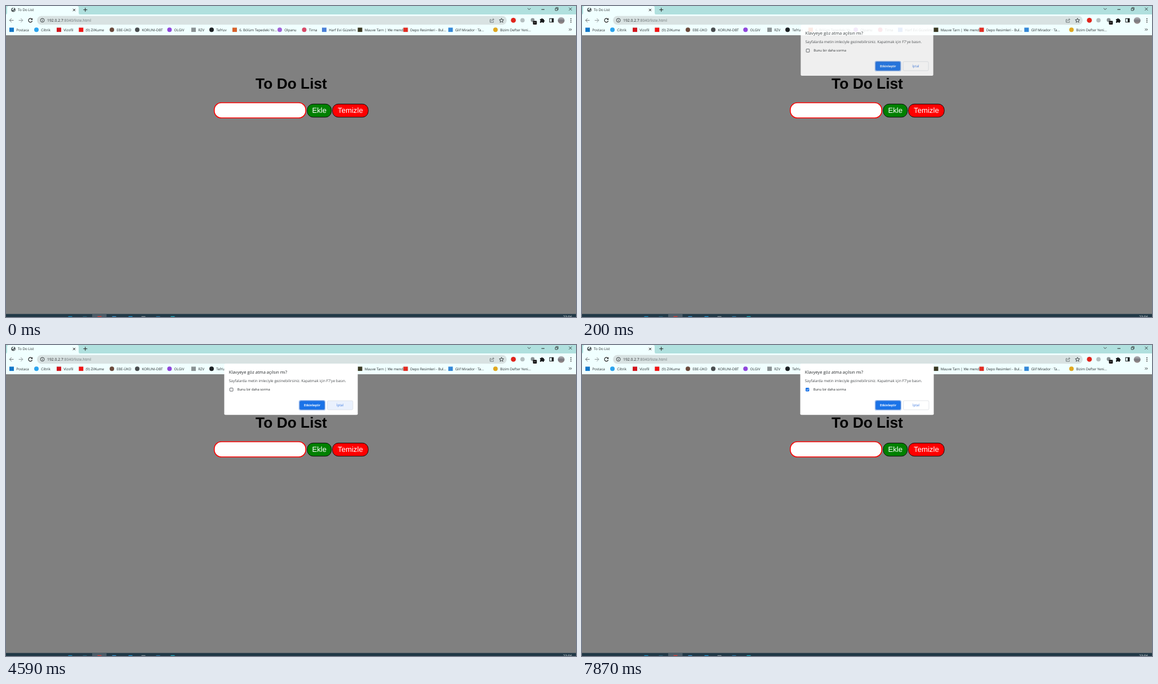
Write an HTML page that moves like this. It is 1012 px wide and 553 px high and loops after 8 s.

```html
<!DOCTYPE html>
<html lang="tr">
<head>
<meta charset="utf-8">
<title>To Do List</title>
<style>
  html, body { margin: 0; width: 100%; height: 100%; overflow: hidden; background: #808080; }
  svg { display: block; width: 100vw; height: 100vh; text-rendering: geometricPrecision; }
  .ui { font-family: "Open Sans", "Noto Sans", sans-serif; font-size: 6.25px; fill: #25292b; }
  .page { font-family: "Liberation Sans", Arial, sans-serif; font-size: 13.18px; }
  .line { fill: none; stroke: #3c4244; stroke-width: 1; }
  .mid { text-anchor: middle; }
</style>
</head>
<body>
<svg viewBox="0 0 1012 553" preserveAspectRatio="none">
  <rect width="1012" height="553" fill="#808080"/>

  <!-- tab strip -->
  <g class="ui">
    <rect width="1012" height="16" fill="#b0e0de"/>
    <rect y="15" width="1012" height="37" fill="#f0ffff"/>
    <path d="M0 15.5Q2 15 2 12V3Q2 0 5 0H126Q129 0 129 3V12Q129 15 132 15.5Z" fill="#f0ffff"/>
    <circle cx="13" cy="6.8" r="3.8" fill="#4d5457"/>
    <path d="M10.3 5.4Q12 6 12.3 4T14.5 4.2L13.6 6.2L11.6 7.6ZM13.2 8.2L15.6 7.2L14.6 9.4Z" fill="#f0ffff"/>
    <text x="21" y="9.2">To Do List</text>
    <g class="line">
      <path d="M118.8 5L123 9.2M123 5L118.8 9.2" stroke="#222"/>
      <path d="M137.3 6.7H144.3M140.8 3.2V10.2" stroke="#222"/>
      <path d="M926.2 4L928.8 6.6L931.4 4"/>
      <path d="M950.6 6.2H956" stroke="#222"/>
      <path d="M975.2 4.2H979V8H975.2ZM976.4 4V2.8H980.2V6.8H979.2" stroke="#222" stroke-width=".8"/>
      <path d="M999.4 2.8L1004.6 8M1004.6 2.8L999.4 8" stroke="#222" stroke-width=".8"/>
    </g>

    <!-- address row -->
    <g class="line">
      <path d="M13.5 25.5H6.4M9.8 22L6.3 25.5L9.8 29" stroke="#6c7476"/>
      <path d="M22.6 25.5H29.7M26.3 22L29.8 25.5L26.3 29" stroke="#8d9799"/>
      <path d="M46.2 23.6A3.4 3.4 0 1 0 46.6 26.5" stroke="#222" stroke-width="1.2"/>
      <path d="M47.2 21.5V24.8H43.9Z" fill="#222" stroke="none"/>
    </g>
    <rect x="55" y="17.8" width="834" height="15.4" rx="7.7" fill="#d8e2e2"/>
    <circle class="line" cx="64.6" cy="25.4" r="3.4" stroke-width=".8"/>
    <path class="line" d="M64.6 25V27.3M64.6 23.3V24.1"/>
    <text x="73" y="27.8" font-size="6.8">192.0.2.7<tspan fill="#6b7476">:8040/liste.html</tspan></text>
    <g class="line" stroke-width=".8">
      <path d="M861.5 24H859.5V29H865.5V27.3M861.5 27Q862 24 866 24M864.2 22L866.4 24L864.2 26" stroke="#6c7476"/>
      <path d="M879.7 21.8L880.8 24.4L883.6 24.6L881.5 26.4L882.2 29.1L879.7 27.6L877.2 29.1L877.9 26.4L875.8 24.6L878.6 24.4Z"/>
    </g>
    <circle cx="900.8" cy="25.4" r="4.4" fill="#e0241c"/>
    <circle cx="917" cy="25.4" r="3.8" fill="#b4bfc0"/>
    <circle cx="935" cy="25" r="3.4" fill="#8a9395"/>
    <rect x="935.6" y="26.6" width="6.8" height="6.4" rx="1" fill="#111"/>
    <path d="M937.5 29.8H940.5" stroke="#ddd" stroke-width=".7"/>
    <path d="M948 23.3H950.2A1.4 1.4 0 1 1 953 23.3H955V25.2A1.4 1.4 0 1 1 955 28V29.8H952.8A1.3 1.3 0 0 0 950.3 29.8H948V27.5A1.3 1.3 0 0 0 948 25Z" fill="#161a1b"/>
    <rect x="965.2" y="22.3" width="6.6" height="6.4" fill="none" stroke="#161a1b"/>
    <rect x="968.8" y="22" width="3.4" height="7" fill="#161a1b"/>
    <circle cx="985.7" cy="25.7" r="6" fill="url(#photo)"/>
    <g fill="#222"><circle cx="1003" cy="22.6" r=".9"/><circle cx="1003" cy="25.6" r=".9"/><circle cx="1003" cy="28.6" r=".9"/></g>
    <path class="line" d="M999.6 40L1001.4 41.9L999.6 43.8M1002.2 40L1004 41.9L1002.2 43.8" stroke="#222"/>
    <g id="marks"></g>
  </g>

  <!-- page -->
  <g class="page">
    <text class="mid" x="506.5" y="147.3" font-size="26.35" font-weight="700">To Do List</text>
    <rect x="369.8" y="172" width="162.4" height="27" rx="12.6" fill="#fff" stroke="red" stroke-width="1.6"/>
    <g stroke="#000" stroke-width=".9">
      <rect x="534.9" y="174.3" width="42.7" height="23.4" rx="10.4" fill="green"/>
      <rect x="579.7" y="174.3" width="63.4" height="23.4" rx="10.4" fill="red"/>
    </g>
    <g class="mid" fill="#fff">
      <text x="556.3" y="190.4">Ekle</text>
      <text x="611.4" y="190.4">Temizle</text>
    </g>
  </g>

  <!-- taskbar -->
  <rect y="547.6" width="1012" height="6" fill="#203846"/>
  <rect x="153" y="547.6" width="25.5" height="6" fill="#4c5c68"/>
  <g id="tasks"></g>
  <text class="ui" x="989" y="555" font-size="6" style="fill:#fff">23:06</text>

  <!-- dialog -->
  <g id="dialog" class="ui">
    <rect x="387.5" y="33.3" width="237" height="91" rx="2" fill="#fff"/>
    <text x="395.8" y="50.6" style="font-size:7.6px">Klavyeye göz atma açılsın mı?</text>
    <text x="395.8" y="65.5" style="font-size:6.5px;fill:#44484b">Sayfalarda metin imleciyle gezinebilirsiniz. Kapatmak için F7'ye basın.</text>
    <circle id="ripple" cx="400.2" cy="79.3" fill="#1a73e8"/>
    <rect id="box" x="397.4" y="76.5" width="5.6" height="5.6" rx=".6" stroke-width=".9"/>
    <path id="tick" d="M398.5 79.4L399.8 80.7L402.2 77.9" fill="none" stroke="#fff" stroke-width=".9"/>
    <text x="410.7" y="81.4" style="font-size:5.9px">Bunu bir daha sorma</text>
    <rect x="520.4" y="98.5" width="46" height="17.3" rx="2.4" fill="#fff" stroke="#86b1f0" stroke-width="1.1"/>
    <rect id="ok" x="521.7" y="99.7" width="43.6" height="14.9" rx="1.4" stroke="#1a62cc" stroke-width=".8"/>
    <text class="mid" x="543.5" y="109.2" style="font-size:5.6px;font-weight:700;fill:#fff">Etkinleştir</text>
    <rect id="cancel" x="570.5" y="99" width="45.4" height="16.2" rx="2" stroke="#dbdfe4" stroke-width=".8"/>
    <text class="mid" x="593" y="109.2" style="font-size:6.1px;fill:#3f7be0">İptal</text>
  </g>

  <defs>
    <linearGradient id="photo" x2="0" y2="1">
      <stop stop-color="#b9b9bd"/><stop offset=".55" stop-color="#77777d"/><stop offset="1" stop-color="#9c8f8c"/>
    </linearGradient>
  </defs>
</svg>
<script>
const LOOP = 8000;
const $ = id => document.getElementById(id);

function add(parent, tag, attrs, text) {
  const el = document.createElementNS("http://www.w3.org/2000/svg", tag);
  set(el, attrs);
  if (text) el.textContent = text;
  parent.appendChild(el);
}
function set(el, attrs) {
  for (const key in attrs) el.setAttribute(key, attrs[key]);
}

// icon centre, icon colour, round?, label
const marks = [
  [10, "#1277c8", 0, "Postaca"], [54, "#2aa4ee", 1, "Ciltrik"],
  [94, "#d2141c", 0, "Vizofil"], [133.3, "#f01414", 0, "(9) ZilKume"],
  [188, "#6b4a3c", 1, "EBE-ÜKO"], [233, "#4a4e50", 1, "KORUNI-DBT"],
  [290.3, "#9046dc", 1, "OLGIV"], [333, "#8b9294", 0, "RZV"],
  [365, "#1c2124", 1, "TelYuv"], [406, "#d8622c", 0, "6. Bölüm Tepedeki Yo..."],
  [486, "#a060d8", 1, "Olpanu"], [529.5, "#d84a68", 1, "Tirna"],
  [565, "#4a80d8", 0, "Harf Evi Güzelim"], [628.5, "#3a3822", 0, "Mauve Tarn | We mend..."],
  [709.5, "#e22c22", 0, "Depo Resimleri - Bul..."], [789.3, "#3488d8", 0, "Glif Mirador · Ta..."],
  [869, "#e0a820", 1, "Bizim Defter Yeni..."]
];
for (const [x, fill, round, label] of marks) {
  if (round) add($("marks"), "circle", { cx: x, cy: 42.3, r: 4, fill });
  else add($("marks"), "rect", { x: x - 4, y: 38.5, width: 8, height: 7.6, fill });
  add($("marks"), "text", { x: x + 8.2, y: 44.5 }, label);
}

const tasks = [[114, "#1d86b4"], [140, "#2a5a70"], [166, "#d83a34"], [192, "#3c8cc0"],
  [221, "#2590c8"], [244, "#7d8a92"], [270, "#2e6f96"], [296, "#20a4b4"]];
for (const [x, fill] of tasks)
  add($("tasks"), "rect", { x: x - 3.5, y: 551.6, width: 7, height: 2, fill });

// value held from the latest step reached
function held(t, start, steps) {
  let value = start;
  for (const [at, v] of steps) if (t >= at) value = v;
  return value;
}
function mix(a, b, k) {
  return "rgb(" + a.map((v, i) => Math.round(v + (b[i] - v) * k)) + ")";
}

function draw(t) {
  const alpha = held(t, 0, [[70, .22], [130, .57], [200, .88], [270, 1]]);
  const scale = held(t, .95, [[70, .962], [130, .979], [200, .993], [270, 1]]);
  set($("dialog"), {
    opacity: alpha,
    transform: `translate(506 78.8) scale(${scale}) translate(-506 -78.8)`
  });

  const okHover = held(t, 0, [[670, .3], [740, .6], [800, .85], [870, 1], [3390, .9], [3460, 0]]);
  const cancelHover = held(t, 0, [[4520, .5], [4590, 1], [6120, .85], [6190, .55], [6260, .25], [6330, 0]]);
  set($("ok"), { fill: mix([26, 115, 232], [47, 126, 227], okHover) });
  set($("cancel"), { fill: mix([255, 255, 255], [234, 241, 253], cancelHover) });

  const checked = t >= 7660;
  set($("box"), { fill: checked ? "#1a73e8" : "#fff", stroke: checked ? "#1a73e8" : "#55595d" });
  set($("tick"), { opacity: checked ? 1 : 0 });
  set($("ripple"), {
    r: held(t, 0, [[7590, 4.5], [7660, 6.5], [7730, 7.7]]),
    opacity: held(t, 0, [[7590, .2], [7660, .22], [7730, .16], [7800, .07], [7870, 0]])
  });
}

const begin = performance.now();
function tick() {
  draw((performance.now() - begin) % LOOP);
  requestAnimationFrame(tick);
}
tick();
</script>
</body>
</html>
```
